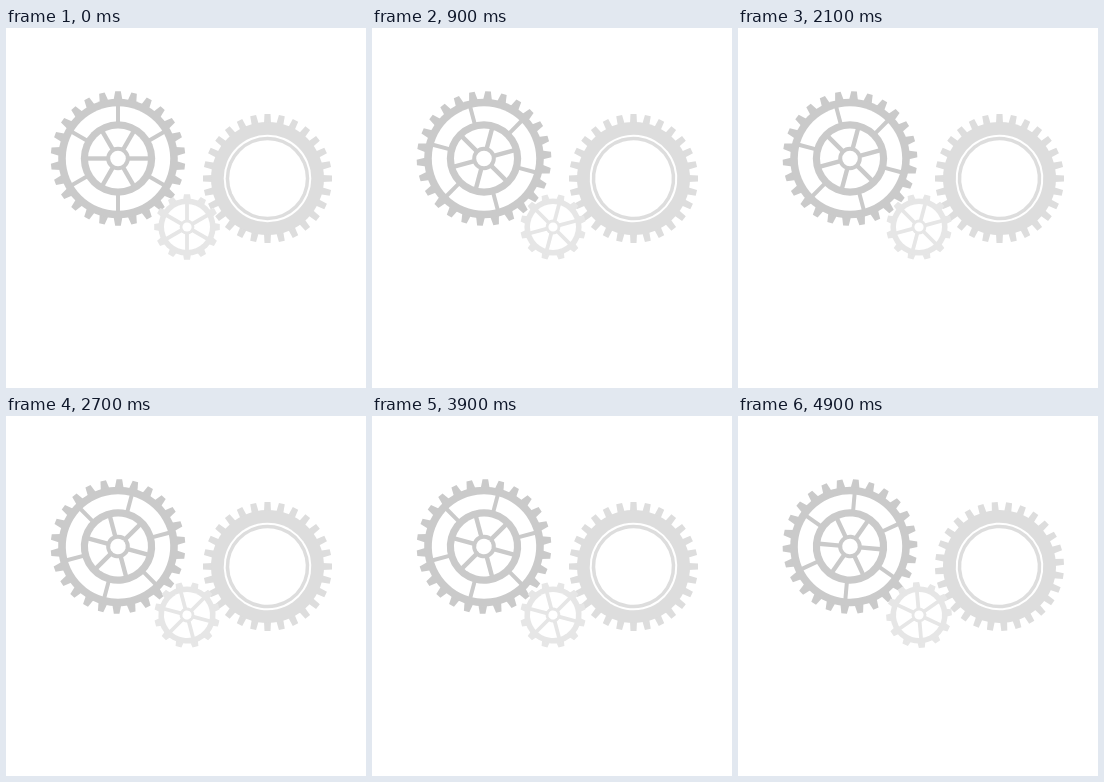
Recreate the animation shown at these times as an HTML page with a canvas. Size 360 by 360 pixels, loop 5000 ms.

```html
<!DOCTYPE html>
<html lang="en">
<head>
<meta charset="utf-8">
<title>Gears</title>
<style>
  html, body { margin: 0; width: 100%; height: 100%; overflow: hidden; background: #fff; }
  canvas { display: block; width: 360px; height: 360px; }
</style>
</head>
<body>
<canvas id="stage" width="360" height="360"></canvas>
<script>
const ctx = document.getElementById('stage').getContext('2d');
const TAU = Math.PI * 2;
const LOOP = 5000, STEP = 100, CYCLE = 12;

function disc(r, color) {
  ctx.fillStyle = color;
  ctx.beginPath();
  ctx.arc(0, 0, r, 0, TAU);
  ctx.fill();
}

// Repeats a shape evenly around the centre, starting at the top.
function around(count, offset, shape) {
  for (let i = 0; i < count; i++) {
    ctx.save();
    ctx.rotate(offset + i * TAU / count);
    shape();
    ctx.restore();
  }
}

function teeth(count, root, tip, rootWidth, tipWidth, color) {
  ctx.fillStyle = color;
  around(count, 0, () => {
    ctx.beginPath();
    ctx.moveTo(-rootWidth / 2, -root + 1);
    ctx.lineTo(-tipWidth / 2, -tip);
    ctx.lineTo(tipWidth / 2, -tip);
    ctx.lineTo(rootWidth / 2, -root + 1);
    ctx.fill();
  });
}

function spokes(count, offset, inner, outer, width, color) {
  ctx.fillStyle = color;
  around(count, offset, () => ctx.fillRect(-width / 2, -outer, width, outer - inner));
}

function place(x, y, angle, paint) {
  ctx.save();
  ctx.translate(x, y);
  ctx.rotate(angle);
  paint();
  ctx.restore();
}

function wheel() {
  const c = '#cacaca';
  teeth(26, 59, 67.3, 9, 5.6, c);
  disc(59.8, c);
  disc(52.2, '#fff');
  spokes(6, 0, 36, 53, 4, c);
  disc(37.2, c);
  disc(30, '#fff');
  spokes(6, TAU / 12, 10, 31, 4.4, c);
  disc(11.8, c);
  disc(7.8, '#fff');
}

function ring() {
  const c = '#dddddd';
  teeth(28, 56, 64.5, 7, 6, c);
  disc(56.5, c);
  disc(43.8, '#fff');
  disc(41.8, c);
  disc(38.3, '#fff');
}

function pinion() {
  const c = '#e6e6e6';
  teeth(12, 28, 32.8, 8, 6, c);
  disc(28.6, c);
  disc(23, '#fff');
  spokes(6, 0, 6, 24, 3.8, c);
  disc(7.4, c);
  disc(4.6, '#fff');
}

function draw(now) {
  const step = Math.floor(now % LOOP / STEP) % CYCLE;
  const turn = step / CYCLE * TAU;
  ctx.fillStyle = '#fff';
  ctx.fillRect(0, 0, 360, 360);
  place(112, 130.5, turn / 6, wheel);
  place(261.5, 150.5, -turn / 7, ring);
  place(181, 199, -turn / 6, pinion);
}

const start = performance.now();
function tick() {
  draw(performance.now() - start);
  requestAnimationFrame(tick);
}
tick();
</script>
</body>
</html>
```
